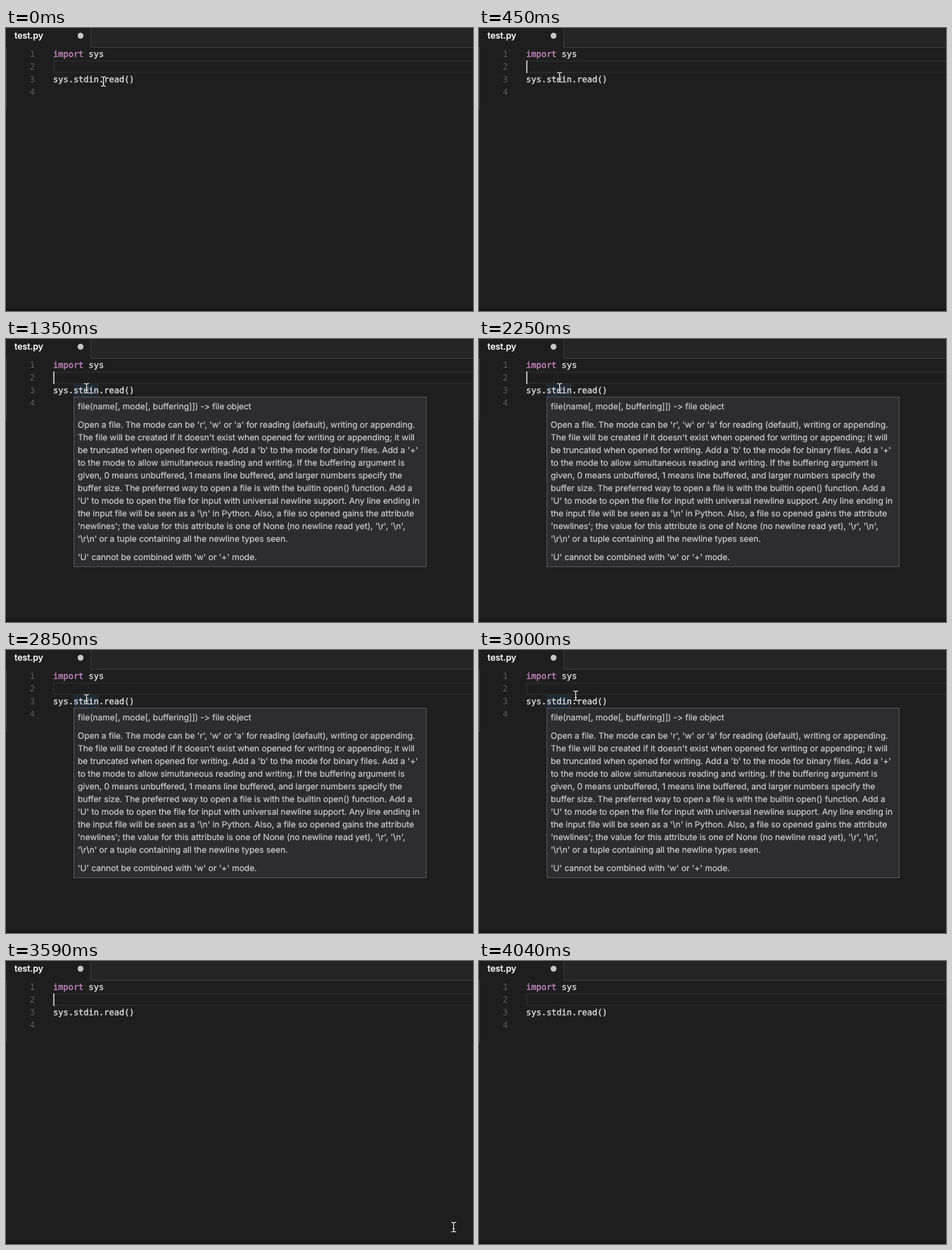
An HTML page for the animation above (4190 ms loop, 664 by 402 pixels).

```html
<!DOCTYPE html>
<html lang="en">
<head>
<meta charset="utf-8">
<title>Editor hover</title>
<style>
  html, body { margin: 0; width: 100%; height: 100%; overflow: hidden; background: #1e1e1e; }
  svg { display: block; width: 664px; height: 402px; }
  text { white-space: pre; text-rendering: geometricPrecision; }
  .code { font: 12px "DejaVu Sans Mono", monospace; fill: #d8d8d8; stroke: #d8d8d8; stroke-width: .4px; }
  .key { fill: #c586c0; stroke: #c586c0; }
  .num { font: 12px "DejaVu Sans Mono", monospace; fill: #5a5a5a; text-anchor: end; }
  .tab { font: 500 12.5px Inter, sans-serif; fill: #fff; stroke: #fff; stroke-width: .25px; }
  .doc { font: 12px Inter, sans-serif; letter-spacing: -.03px; fill: #ccc; stroke: #ccc; stroke-width: .2px; }
</style>
</head>
<body>
<svg viewBox="0 0 664 402">
  <rect width="664" height="402" fill="#1e1e1e"/>
  <rect x="120" width="544" height="28" fill="#3b3b3b"/>
  <rect x="121" width="543" height="27" fill="#252526"/>
  <rect y="27" width="1" height="89" fill="#414141"/>
  <rect y="398" width="664" height="4" fill="#191718"/>
  <text class="tab" x="12" y="15">test.py</text>
  <circle cx="106" cy="11" r="4.2" fill="#c5c5c5"/>
  <rect x="68" y="47" width="600" height="16" fill="none" stroke="#282828" stroke-width="2"/>
  <rect id="word" x="96" y="64" width="36" height="18" fill="#202a34"/>
  <g id="nums"></g>
  <text class="code" x="67" y="41"><tspan class="key">import</tspan> sys</text>
  <text class="code" x="67" y="77">sys.stdin.read()</text>
  <rect id="caret" x="67" y="46" width="2" height="18" fill="#aeafad"/>
  <g id="hover">
    <rect x="96.5" y="82.5" width="501" height="241" fill="#2d2d30" stroke="#555"/>
  </g>
  <g id="mouse" fill="none">
    <path id="beam" d="M-2.8 -6.7H-1L.5 -5.5L2 -6.7H3.8M.5 -5.5V5.5M-2.8 6.7H-1L.5 5.5L2 6.7H3.8M-1 2.5H2"/>
  </g>
</svg>
<script>
const LOOP = 4190;

// Paragraphs: first baseline, then lines
const doc = [
  [100, "file(name[, mode[, buffering]]) -> file object"],
  [126, "Open a file. The mode can be 'r', 'w' or 'a' for reading (default), writing or appending.",
    "The file will be created if it doesn't exist when opened for writing or appending; it will",
    "be truncated when opened for writing. Add a 'b' to the mode for binary files. Add a '+'",
    "to the mode to allow simultaneous reading and writing. If the buffering argument is",
    "given, 0 means unbuffered, 1 means line buffered, and larger numbers specify the",
    "buffer size. The preferred way to open a file is with the builtin open() function. Add a",
    "'U' to mode to open the file for input with universal newline support. Any line ending in",
    "the input file will be seen as a '\\n' in Python. Also, a file so opened gains the attribute",
    "'newlines'; the value for this attribute is one of None (no newline read yet), '\\r', '\\n',",
    "'\\r\\n' or a tuple containing all the newline types seen."],
  [314, "'U' cannot be combined with 'w' or '+' mode."]
];

// Time and position of the pointer; it has left the stage at the last step
const moves = [
  [0, 138, 76], [150, 121, 71], [300, 116, 70], [450, 114, 70],
  [3000, 137, 65], [3140, 276, 50], [3290, 563, 93], [3440, 613, 244],
  [3590, 636, 378], [3740, 637, 387], [3890, 637, 409], [4040, 637, 430]
];
// Time and visibility
const carets = [[0, 0], [300, 1], [750, 0], [1350, 1], [1800, 0], [2250, 1], [2850, 0], [3290, 1], [3740, 0]];
const hovers = [[0, 0], [750, 1], [3140, 0]];

const $ = id => document.getElementById(id);
const at = (steps, t) => steps.filter(s => s[0] <= t).pop();
const show = (id, on) => $(id).setAttribute("visibility", on ? "visible" : "hidden");

function addText(parent, cls, x, y, str) {
  const el = document.createElementNS("http://www.w3.org/2000/svg", "text");
  el.setAttribute("class", cls);
  el.setAttribute("x", x);
  el.setAttribute("y", y);
  el.textContent = str;
  parent.append(el);
}

function paint(path, color, width) {
  path.setAttribute("stroke", color);
  path.setAttribute("stroke-width", width);
}

for (let n = 1; n <= 4; n++) addText($("nums"), "num", 41, 23 + 18 * n, n);
for (const [top, ...lines] of doc)
  lines.forEach((line, i) => addText($("hover"), "doc", 102, top + 18 * i, line));

// Light pointer over a dark outline
const light = $("beam").cloneNode();
light.removeAttribute("id");
paint($("beam"), "#1a1a1a", 2.6);
paint(light, "#f4f4f4", 1.2);
$("mouse").append(light);

function draw(now) {
  const t = now % LOOP;
  const [, x, y] = at(moves, t);
  $("mouse").setAttribute("transform", `translate(${x} ${y})`);
  show("caret", at(carets, t)[1]);
  const open = at(hovers, t)[1];
  show("hover", open);
  show("word", open);
}

const start = performance.now();
function tick() {
  draw(performance.now() - start);
  requestAnimationFrame(tick);
}
tick();
</script>
</body>
</html>
```
